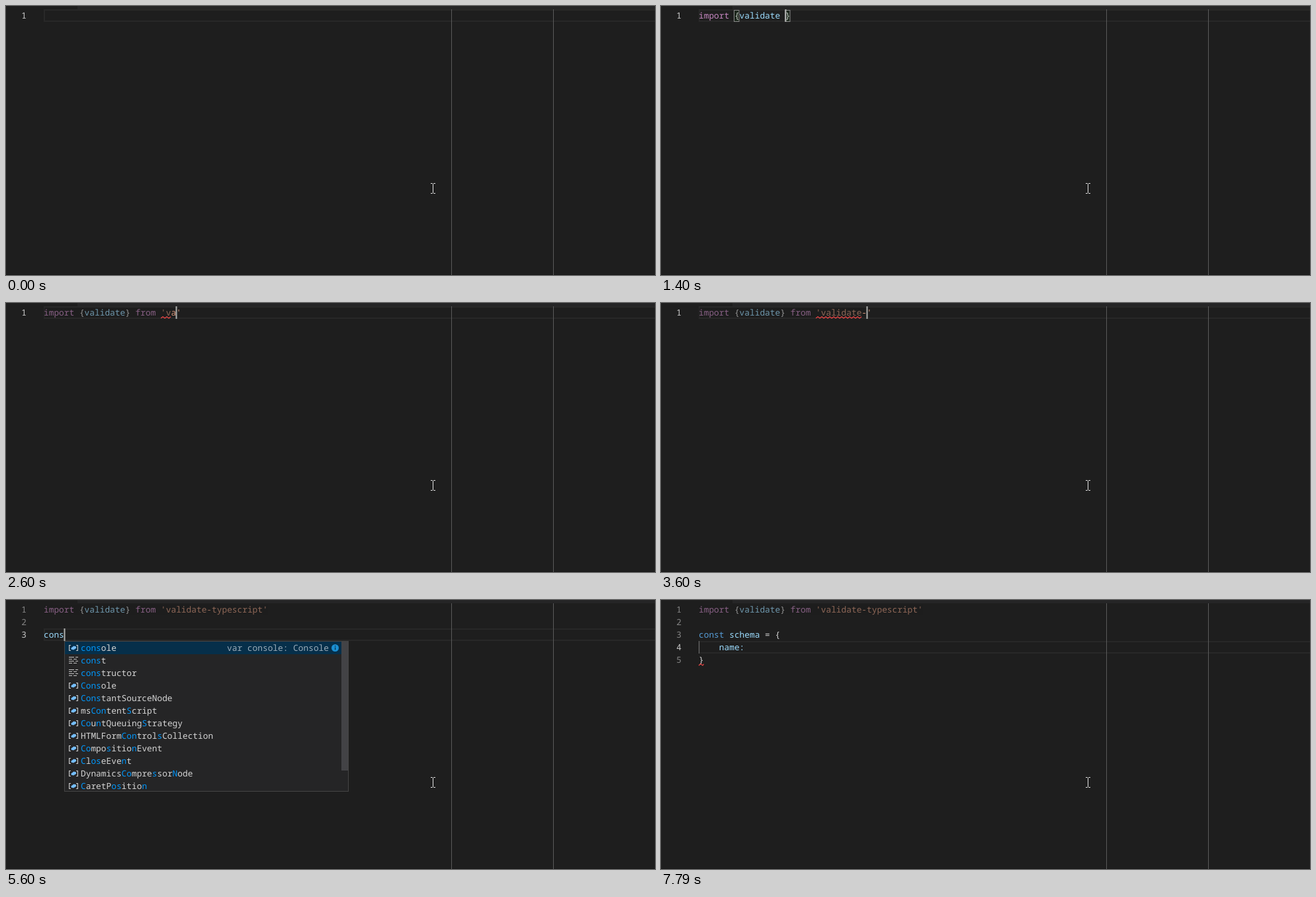
Write an HTML page that moves like this. It is 981 by 407 pixels and loops after 8000 ms.

```html
<!DOCTYPE html>
<html lang="en">
<head>
<meta charset="utf-8">
<title>Editor typing</title>
<style>
  html, body { margin: 0; width: 100%; height: 100%; overflow: hidden; background: #1e1e1e; }
  svg { display: block; width: 981px; height: 407px; }
  text {
    font-family: "Noto Sans Mono", "DejaVu Sans Mono", monospace;
    font-size: 12.833px;
    white-space: pre;
    text-rendering: geometricPrecision;
  }
</style>
</head>
<body>
<svg viewBox="0 0 981 407">
  <rect width="981" height="407" fill="#1e1e1e"/>
  <rect x="108" width="873" height="5" fill="#252526"/>
  <rect y="406" width="981" height="1" fill="#161616"/>
  <g id="editor"></g>
  <path d="M642 268.5h2.5l1 1 1-1h2.500M645.500 269.500v13M642 283.500h2.500l1-1 1 1h2.500" fill="none" stroke="#e4e4e4"/>
</svg>
<script>
const LOOP = 8000, LEFT = 57, TOP = 5, CW = 7.7, LH = 19;
const editor = document.getElementById('editor');

// Popup rows: asterisks toggle the match colour; a leading # marks a keyword, @ a module.
const globals = ['AbortController', 'AbortSignal', 'AnalyserNode', 'Animation', 'AnimationEvent',
  'ApplicationCache', '#arguments', 'Array', 'ArrayBuffer', '#async', 'Attr', 'Audio'];
const modules = ['@assert', '@buffer', '@child_process', '@cluster', '@console', '@constants',
  '@crypto', '@dgram', '@dns', '@domain', '@events', '@fs'];
const cons = ['*cons*ole', '#*cons*t', '#*cons*tructor', '*Cons*ole', '*Cons*tantSourceNode',
  'ms*Con*tent*S*cript', '*Co*u*n*tQueuing*S*trategy', 'HTMLForm*Con*trol*s*Collection',
  '*Co*mpo*s*itio*n*Event', '*C*l*os*eEve*n*t', 'Dynamics*Co*mpre*s*sor*N*ode', '*C*aretP*os*itio*n*'];

const from = "import {validate} from '";
const head = from + "validate-typescript'";
const path = (typed, lag, more) => ({
  text: from + typed + "|'", dim: [0, 0, 24 + lag], wave: [0, 23, 24 + lag], ...more
});
const body = (rest, more) => ({ text: head + '\n\n' + rest, dim: [0, 0, 44], ...more });
const block = (line, more) => body('const schema = {\n    ' + line + '\n}', { guide: true, ...more });

// "|" is the caret.
const steps = [
  [0, { text: '|', off: true }],
  [200, { text: 'im|' }],
  [400, { text: 'impor|' }],
  [600, { text: 'import |', rows: globals }],
  [800, { text: 'import {|}' }],
  [1000, { text: 'import {val|}' }],
  [1200, { text: 'import {valida|}' }],
  [1400, { text: 'import {validate |}' }],
  [1600, { text: 'import {validate|}' }],
  [1800, { text: 'import {validate} f|' }],
  [2000, { text: 'import {validate} from|' }],
  [2200, { text: from + "|'", rows: modules }],
  [2390, { text: from + "v|'", rows: ['@*v*m'], at: 24 }],
  [2600, path('va', 1)],
  [2800, path('val', 2)],
  [3000, path('valid', 3)],
  [3200, path('valida', 5)],
  [3400, path('validate', 6)],
  [3600, path('validate-', 8)],
  [3800, path('validate-t', 9, { rows: ['@*t*ls', '@*t*ty'] })],
  [4000, path('validate-typ', 10)],
  [4200, path('validate-types', 12)],
  [4400, path('validate-typescri', 14)],
  [4600, path('validate-typescript', 17)],
  [4800, { text: head + '|', dim: [0, 0, 44] }],
  [5000, { text: head + '\n|', dim: [0, 0, 44] }],
  [5200, body('|')],
  [5400, body('co|')],
  [5600, body('cons|', { rows: cons, detail: 'var console: Console' })],
  [5800, body('const s|')],
  [6000, body('const sche|', { rows: ['*sche*ma'] })],
  [6200, body('const schema|')],
  [6400, body('const schema = |')],
  [6600, body('const schema = {|}', { wave: [2, 13, 14] })],
  [6800, block('|')],
  [7000, block('na|')],
  [7200, block('name|', { fade: [2, 6, 12] })],
  [7390, block('name:|', { fade: [2, 6, 12] })],
  [7590, block('name:|', { wave: [4, 0, 1] })],
  [7790, block('name:|', { wave: [4, 0, 1], off: true })]
];

const colX = c => LEFT + c * CW;
const rowY = r => TOP + r * LH;
const rect = (x, y, w, h, fill, extra = '') =>
  `<rect x="${x}" y="${y}" width="${w}" height="${h}" fill="${fill}" ${extra}/>`;
const text = (x, y, fill, content, extra = '') =>
  `<text x="${x}" y="${y}" fill="${fill}" ${extra}>${content}</text>`;
const span = (fill, s) => `<tspan fill="${fill}">${s}</tspan>`;

function tokenColor(s) {
  if (s === 'import' || s === 'from') return '#c586c0';
  if (s === 'const') return '#569cd6';
  if (s[0] === "'") return '#ce9178';
  return /^\w/.test(s) ? '#9cdcfe' : '#d4d4d4';
}

const codeLine = (s, r) => text(LEFT, rowY(r) + 14, '#d4d4d4',
  s.replace(/'[^']*'?|\w+:?|[^\w']+/g, t => span(tokenColor(t), t)));

const shade = ([r, a, b]) =>
  rect(colX(a), rowY(r) + 2, (b - a) * CW, LH - 4, '#1e1e1e', 'opacity=".36"');

function squiggle([r, a, b]) {
  const y = rowY(r), end = colX(b);
  let x = colX(a), up = false, d = `M${x} ${y + 18}`;
  while (x < end - 1) {
    x = Math.min(x + 3, end);
    up = !up;
    d += `L${x} ${y + (up ? 15.8 : 18)}`;
  }
  return `<path d="${d}" fill="none" stroke="#f44747" stroke-width="1.1"/>`;
}

function brackets(line, r, c) {
  if (line[c] !== '}' && line[c - 1] !== '{') return '';
  const a = line.indexOf('{'), b = line.indexOf('}');
  if (a < 0 || b < 0) return '';
  return [a, b].map(i => rect(Math.floor(colX(i)) + .5, rowY(r) + 1.5, 7.5, 17,
    'rgba(0,100,0,.1)', 'stroke="#888"')).join('');
}

function icon(x, y, kind) {
  const stroke = d => `<path d="${d}" fill="none" stroke="#c5c5c5" stroke-width="1.2"/>`;
  if (kind === '#')
    return stroke(`M${x} ${y - 5}h8m2 0h4M${x} ${y - 2}h5m2 0h5M${x} ${y + 1}h8m2 0h4M${x} ${y + 4}h5m2 0h5`);
  if (kind === '@')
    return stroke(`M${x + 5} ${y - 5}h-2v4l-1.500 1 1.500 1v4h2M${x + 9} ${y - 5}h2v4l1.500 1-1.500 1v4h-2`);
  return stroke(`M${x + 3} ${y - 4}h-2.400v8h2.400M${x + 11} ${y - 4}h2.400v8h-2.400`) +
    `<path d="M${x + 3.5} ${y}l4-3 3.500 1v2.500l-4 2.500-3.500-1z" fill="#75beff"/>`;
}

function popup(x, y, rows, detail) {
  const h = rows.length * LH, full = rows.length > 11;
  let out = rect(x + .5, y + .5, 429, h - 1, '#252526', 'stroke="#454545"') +
    rect(x + 1, y + 1, full ? 418 : 428, Math.min(LH, h - 2), '#062f4a');
  if (full) out += rect(x + 419, y + 1, 10, 195, '#434346');
  rows.forEach((row, i) => {
    const kind = /^[#@]/.test(row) ? row[0] : '';
    const parts = row.slice(kind.length).split('*');
    const label = parts.map((p, k) => span(k % 2 ? '#0097fb' : '#d4d4d4', p)).join('');
    const mid = y + i * LH + 10.5;
    out += icon(x + 7, mid, kind) + text(x + 25, mid + 4.5, '#d4d4d4', label);
  });
  if (detail) {
    out += text(x + 400, y + 15, '#9aabb8', detail, 'text-anchor="end"') +
      `<circle cx="${x + 409.5}" cy="${y + 10.5}" r="5.500" fill="#1b8fd2"/>` +
      rect(x + 409, y + 7, 1.2, 1.5, '#082f49') + rect(x + 409, y + 9.5, 1.2, 4, '#082f49');
  }
  return out;
}

function draw(s) {
  const before = s.text.split('|')[0].split('\n');
  const r = before.length - 1, c = before[r].length;
  const lines = s.text.replace('|', '').split('\n');
  let out = rect(LEFT + 1, rowY(r) + 1, 940, 17, 'none', 'stroke="#282828" stroke-width="2"');
  out += [80, 100].map(n => rect(colX(n), TOP, 1, 402, '#5a5a5a')).join('');
  lines.forEach((line, i) => {
    out += text(31, rowY(i) + 14, i === r ? '#c6c6c6' : '#858585', i + 1, 'text-anchor="end"');
    out += codeLine(line, i);
  });
  if (s.guide) out += rect(LEFT, rowY(3), 1, LH, '#707070');
  if (s.dim) out += shade(s.dim);
  if (s.fade) out += shade(s.fade);
  out += brackets(lines[r], r, c);
  if (s.wave) out += squiggle(s.wave);
  if (!s.off) out += rect(Math.round(colX(c)) - .5, rowY(r), 2, LH, '#aeafad');
  if (s.rows) out += popup(Math.round(colX(s.at ?? c)), rowY(r + 1), s.rows, s.detail);
  editor.innerHTML = out;
}

let shown = null;
const start = performance.now();
function tick() {
  const t = (performance.now() - start) % LOOP;
  const step = steps.filter(([at]) => at <= t).pop();
  if (step !== shown) draw((shown = step)[1]);
  requestAnimationFrame(tick);
}
tick();
</script>
</body>
</html>
```
